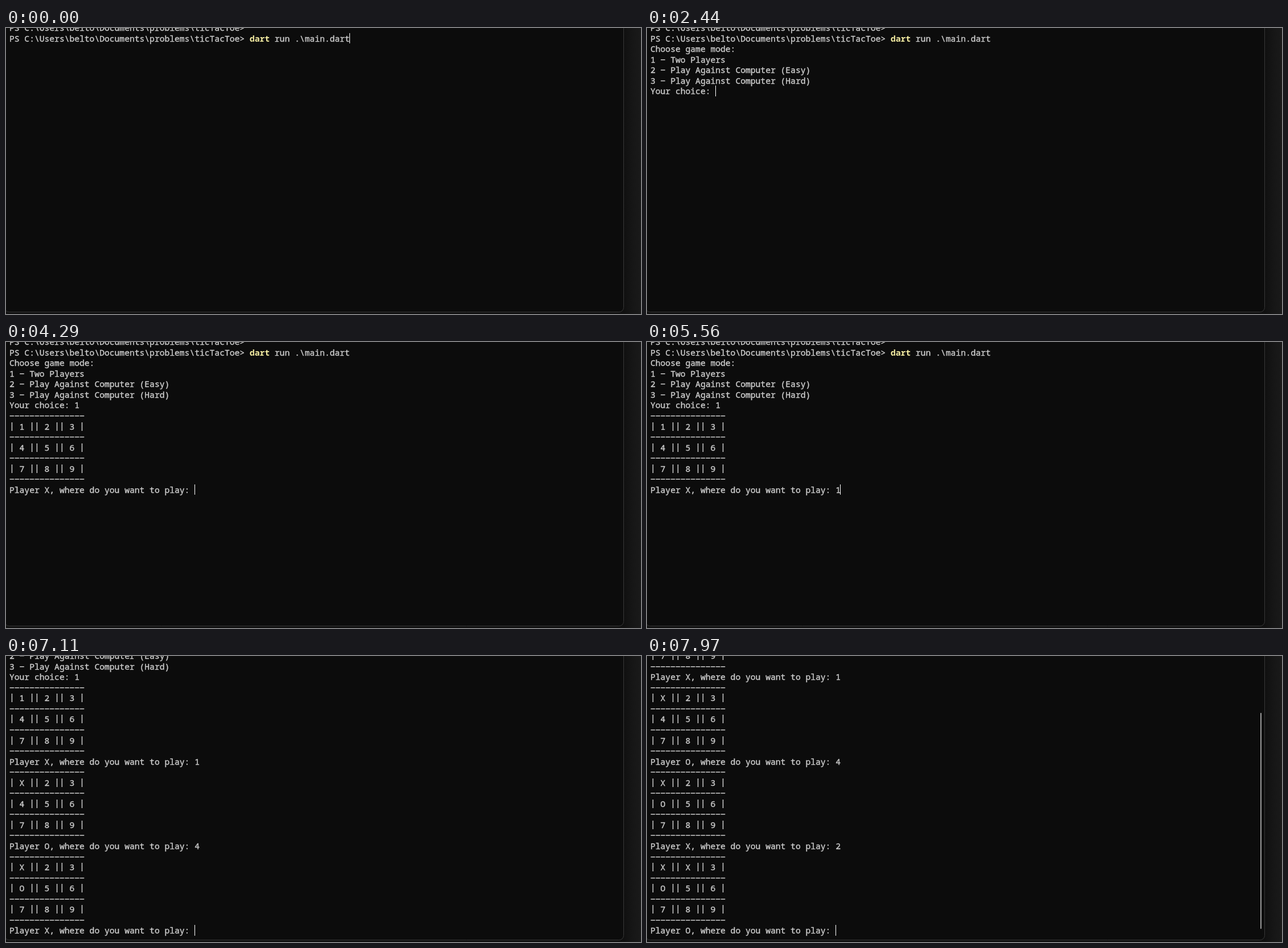
An HTML page with a canvas for the animation above (8 s loop, 1115 by 502 pixels).

```html
<!DOCTYPE html>
<html lang="en">
<head>
<meta charset="utf-8">
<title>Tic-tac-toe in a terminal</title>
<style>
  html, body { margin: 0; width: 100%; height: 100%; overflow: hidden; background: #181818; }
  canvas { display: block; }
</style>
</head>
<body>
<canvas id="stage" width="1115" height="502"></canvas>
<script>
const ctx = document.getElementById('stage').getContext('2d');
const LOOP = 8000;
const LEFT = 6, CELL = 8.789, TOP = -9.9, PITCH = 18.55, BASELINE = 15;
const FONT = '14.65px "Noto Sans Mono", "DejaVu Sans Mono", monospace';
const TEXT = '#cccccc', YELLOW = '#f9f1a5';

const PROMPT = 'PS C:\\Users\\belto\\Documents\\problems\\ticTacToe> ';
const MENU = [
  'Choose game mode:',
  '1 - Two Players',
  '2 - Play Against Computer (Easy)',
  '3 - Play Against Computer (Hard)'
];

// Each turn prints the board and a question; the answer is typed later.
const TURNS = [
  { at: 4290, cells: '123456789', player: 'X', answer: '1', typed: 5560 },
  { at: 5830, cells: 'X23456789', player: 'O', answer: '4', typed: 6840 },
  { at: 7110, cells: 'X23O56789', player: 'X', answer: '2', typed: 7710 },
  { at: 7970, cells: 'XX3O56789', player: 'O', answer: '', typed: LOOP }
];

// Spans in which the cursor is hidden.
const HIDDEN = [[650, 1450], [1910, 2440], [2970, 3430], [4090, 4290], [4960, 5490], [6440, 6840]];

const colX = col => LEFT + col * CELL;
const rowY = row => Math.round(TOP + row * PITCH);

function boardLines(cells) {
  const rule = '-'.repeat(15);
  const lines = [rule];
  for (let i = 0; i < 9; i += 3) {
    lines.push([...cells.slice(i, i + 3)].map(c => `| ${c} |`).join(''), rule);
  }
  return lines;
}

function screenLines(t) {
  const lines = [PROMPT, PROMPT + 'dart run .\\main.dart'];
  if (t >= 580 && t < 1390) lines.push('');
  if (t >= 1390) lines.push(...MENU, 'Your choice: ' + (t >= 3430 ? '1' : ''));
  for (const turn of TURNS) {
    if (t < turn.at) break;
    const answer = t >= turn.typed ? turn.answer : '';
    lines.push(...boardLines(turn.cells), `Player ${turn.player}, where do you want to play: ${answer}`);
  }
  return lines;
}

function drawChar(char, x, y, bold) {
  if (char === '-') ctx.fillRect(x + 0.6, y + 9, 7.6, 1.5);
  else if (char === '|') ctx.fillRect(x + 3.7, y + 2, 1.5, 15);
  else if (char !== ' ') {
    ctx.font = (bold ? 'bold ' : '') + FONT;
    ctx.fillText(char, x, y + BASELINE);
    // A hairline outline gives the regular face a medium weight.
    if (!bold) ctx.strokeText(char, x, y + BASELINE);
  }
}

function drawLine(line, row) {
  ctx.lineWidth = 0.4;
  ctx.strokeStyle = TEXT;
  [...line].forEach((char, col) => {
    const command = line.startsWith(PROMPT) && col >= PROMPT.length && col < PROMPT.length + 4;
    ctx.fillStyle = command ? YELLOW : TEXT;
    drawChar(char, colX(col), rowY(row), command);
  });
}

function drawWindow() {
  const backdrop = ctx.createLinearGradient(1085, 0, 1115, 0);
  backdrop.addColorStop(0, '#101010');
  backdrop.addColorStop(0.5, '#161616');
  backdrop.addColorStop(1, '#1a1a1a');
  ctx.fillStyle = backdrop;
  ctx.fillRect(0, 0, 1115, 502);
  ctx.beginPath();
  ctx.roundRect(-2.5, -100, 1087, 598.5, 8);
  ctx.fillStyle = '#0c0c0c';
  ctx.fill();
  ctx.strokeStyle = '#383838';
  ctx.lineWidth = 1;
  ctx.stroke();
}

function drawScrollbar(history) {
  const trackTop = -52, trackEnd = 479, viewRows = 30;
  const y = trackTop + (trackEnd - trackTop) * history / (history + viewRows);
  ctx.fillStyle = '#9a9a9a';
  ctx.beginPath();
  ctx.roundRect(1077, y, 2, trackEnd - y, 1);
  ctx.fill();
}

function draw(t) {
  drawWindow();
  const lines = screenLines(t);
  const scroll = Math.max(0, lines.length - 27);
  lines.slice(scroll).forEach(drawLine);

  if (!HIDDEN.some(([from, to]) => t >= from && t < to)) {
    const row = lines.length - 1 - scroll;
    ctx.fillStyle = '#ffffff';
    ctx.fillRect(Math.floor(colX(lines.at(-1).length)), rowY(row), 1, rowY(row + 1) - rowY(row));
  }
  if (t >= 7180) drawScrollbar(scroll);
}

const start = performance.now();
function frame() {
  draw((performance.now() - start) % LOOP);
  requestAnimationFrame(frame);
}
frame();
</script>
</body>
</html>
```
